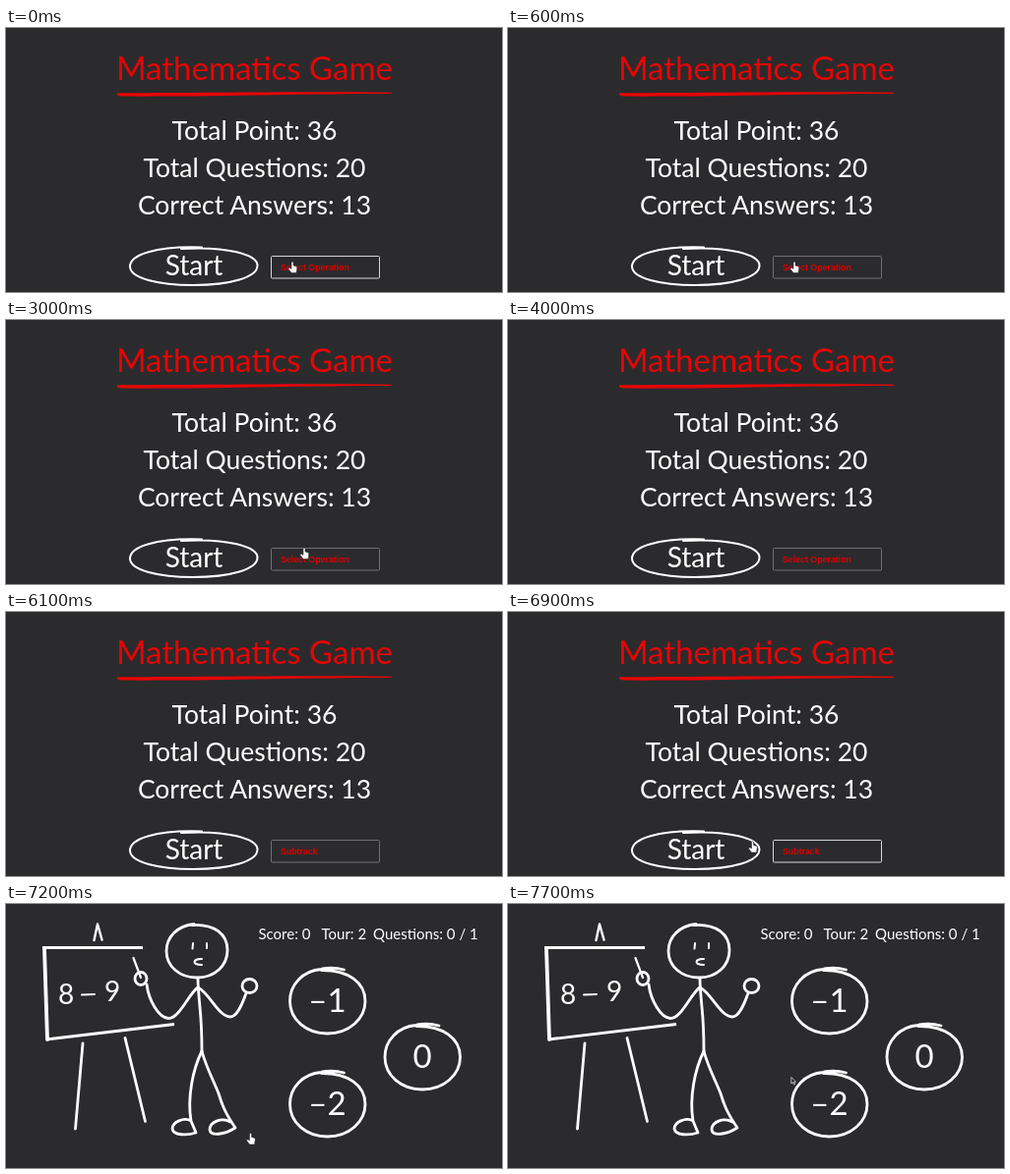
Animation, 504 px wide and 269 px high, one loop 8 s. Source, as an HTML page:

```html
<!DOCTYPE html>
<html lang="en">
<head>
<meta charset="utf-8">
<title>Mathematics Game</title>
<style>
  html, body { margin: 0; width: 100%; height: 100%; overflow: hidden; background: #2b2b2d; }
  svg { display: block; width: 100vw; height: 100vh; }
  text { font-family: Lato, "Open Sans", sans-serif; fill: #fff; }
  .mid { text-anchor: middle; }
  .line { font-size: 26.5px; }
  .title { font-size: 33px; fill: #e90404; }
  .start { font-size: 28px; }
  .score { font-size: 15px; }
  .sum { font-size: 28px; }
  .answer { font-size: 33px; }
  .option { font: bold 8.8px "Liberation Sans", Arial, sans-serif; fill: #dc0000; }
  .chalk { fill: none; stroke: #fff; stroke-linecap: round; stroke-linejoin: round; }
</style>
</head>
<body>
<svg viewBox="0 0 504 269">
  <defs>
    <path id="ring" class="chalk" stroke-width="2.8"
      d="M-6 -32.5C-25 -31 -38 -17 -38 0C-38 19 -21 33 0 33C22 33 38.500 18 38.500 0C38.500 -19 21 -32 -6 -31.500M-5 -33Q6 -35 17 -32"/>
    <!-- both pointers have their tip at 0,0 -->
    <path id="handShape" fill="#fff" stroke="#222" stroke-width=".5"
      d="M-1 .7Q0 -.6 1 .7V4L4 5Q5 5.500 4.700 7L4 11.500H-1L-4 7.500Q-4 6 -2.500 6.500L-1 7.500Z"/>
    <path id="arrowShape" fill="#222" stroke="#ddd" stroke-width=".8" stroke-linejoin="round"
      d="M.4 .5V7L1.900 5.700L3 8L4 7.500L3 5.300H5Z"/>
  </defs>

  <g id="menu">
    <text class="title mid" x="252.500" y="52.500">Mathematics Game</text>
    <path fill="#e90404" d="M113 66.300C180 66.500 300 64.500 392 65.800Q394 66.600 390 67C300 67 220 70 117 69.600Q112 69 113 66.300Z"/>
    <text class="line mid" x="252.500" y="113.500">Total Point: 36</text>
    <text class="line mid" x="252.500" y="152">Total Questions: 20</text>
    <text class="line mid" x="252.500" y="190">Correct Answers: 13</text>
    <path class="chalk" stroke-width="2"
      d="M199 223.500C152 222 126 231 126 243C126 255 155 262 190 262C228 262 255.500 254 255.500 242C255.500 231 225 222 178 225"/>
    <text class="start mid" x="191" y="252">Start</text>
    <rect id="box" x="269.500" y="232.500" width="110" height="22.500" rx="1" fill="none"/>
    <text id="option" class="option" x="279" y="247"></text>
  </g>

  <g id="lesson">
    <text class="score" x="256.500" y="36">Score: 0</text>
    <text class="score" x="320.500" y="36">Tour: 2</text>
    <text class="score" x="373" y="36">Questions: 0 / 1</text>
    <g class="chalk" stroke-width="2.800">
      <path stroke-width="2.400" d="M89.500 37L93 20.500L97.500 36.500"/>
      <path stroke-linecap="butt" d="M37 44.500H139"/>
      <path stroke-width="3.800" d="M39 45L42 138"/>
      <path stroke-linecap="butt" d="M41 138L171 122.500"/>
      <path d="M78 142L70.500 229M121 136.500L141.500 221.500"/>
      <path d="M191 20.500C174 22 163 34 163 48C163 64 177 75 194 75C212 75 225 63 225 47C225 31 212 20 189 21.500"/>
      <path stroke-width="2" d="M190 40L189.500 45.500M204 40V45M199 56C190 55.500 188 62 199 62"/>
      <path d="M195 76Q195 84 197 105Q199 125 199 150"/>
      <path d="M195 85C186 91 176 117 165 116.500C155 116 145 98 143 82"/>
      <path d="M195 85C207 91 216 115 228 115C235 115 240 102 244 91"/>
      <ellipse cx="247.500" cy="83.500" rx="7.500" ry="7"/>
      <path stroke-width="2.200" d="M129.500 55L137 75"/>
      <ellipse cx="137" cy="76" rx="6" ry="6.500"/>
      <path d="M199 150C190 168 184 197 188 221L193 233C184 236 170 236 169 229C169 222 181 217 188 221"/>
      <path d="M199 150C204 168 211 180 216 193C219 203 222 212 233 228C222 235 208 237 207 230C207 222 219 217 228 222"/>
    </g>
    <path id="lone" class="chalk" stroke-width="1.800" d="M55 92.300L66 91.300"/>
    <g id="round">
      <text class="sum mid" x="61" y="102">8</text>
      <path class="chalk" stroke-width="2" d="M77 92.500L90 92"/>
      <text class="sum mid" x="108" y="99">9</text>
      <use href="#ring" x="326.500" y="99"/>
      <use href="#ring" x="326.500" y="204"/>
      <use href="#ring" x="423" y="156"/>
      <text class="answer mid" x="326.500" y="110">–1</text>
      <text class="answer mid" x="326.500" y="215">–2</text>
      <text class="answer mid" x="423" y="167">0</text>
    </g>
  </g>

  <use id="hand" href="#handShape"/>
  <use id="arrow" href="#arrowShape"/>
</svg>
<script>
const LOOP = 8000;
const PICK = "Select Operation", DONE = "Subtrack";
const steps = [
  { at: 0,    option: PICK, lit: true, hand: [291, 238] },
  { at: 600,  option: PICK, hand: [291, 238] },
  { at: 2000, option: PICK, hand: [303, 232] },
  { at: 4000, option: PICK },
  { at: 6100, option: DONE },
  { at: 6500, option: DONE, arrow: [267.500, 240] },
  { at: 6900, option: DONE, lit: true, hand: [248.500, 233.500] },
  { at: 7100, lesson: true, hand: [248.500, 233.500] },
  { at: 7200, lesson: true, round: true, hand: [248.500, 233.500] },
  { at: 7700, lesson: true, round: true, arrow: [287.500, 176] }
];
const $ = id => document.getElementById(id);
const show = (id, on) => $(id).setAttribute("display", on ? "inline" : "none");

function place(id, pos) {
  show(id, pos);
  if (pos) $(id).setAttribute("transform", `translate(${pos})`);
}

function render(s) {
  show("menu", !s.lesson);
  show("lesson", s.lesson);
  show("lone", !s.round);
  show("round", s.round);
  $("option").textContent = s.option || "";
  $("box").setAttribute("stroke", s.lit ? "#d8d8d8" : "#707072");
  place("hand", s.hand);
  place("arrow", s.arrow);
}

let current;
const origin = performance.now();
function tick() {
  const t = (performance.now() - origin) % LOOP;
  const step = steps.findLast(s => s.at <= t);
  if (step !== current) render(current = step);
  requestAnimationFrame(tick);
}
tick();
</script>
</body>
</html>
```
